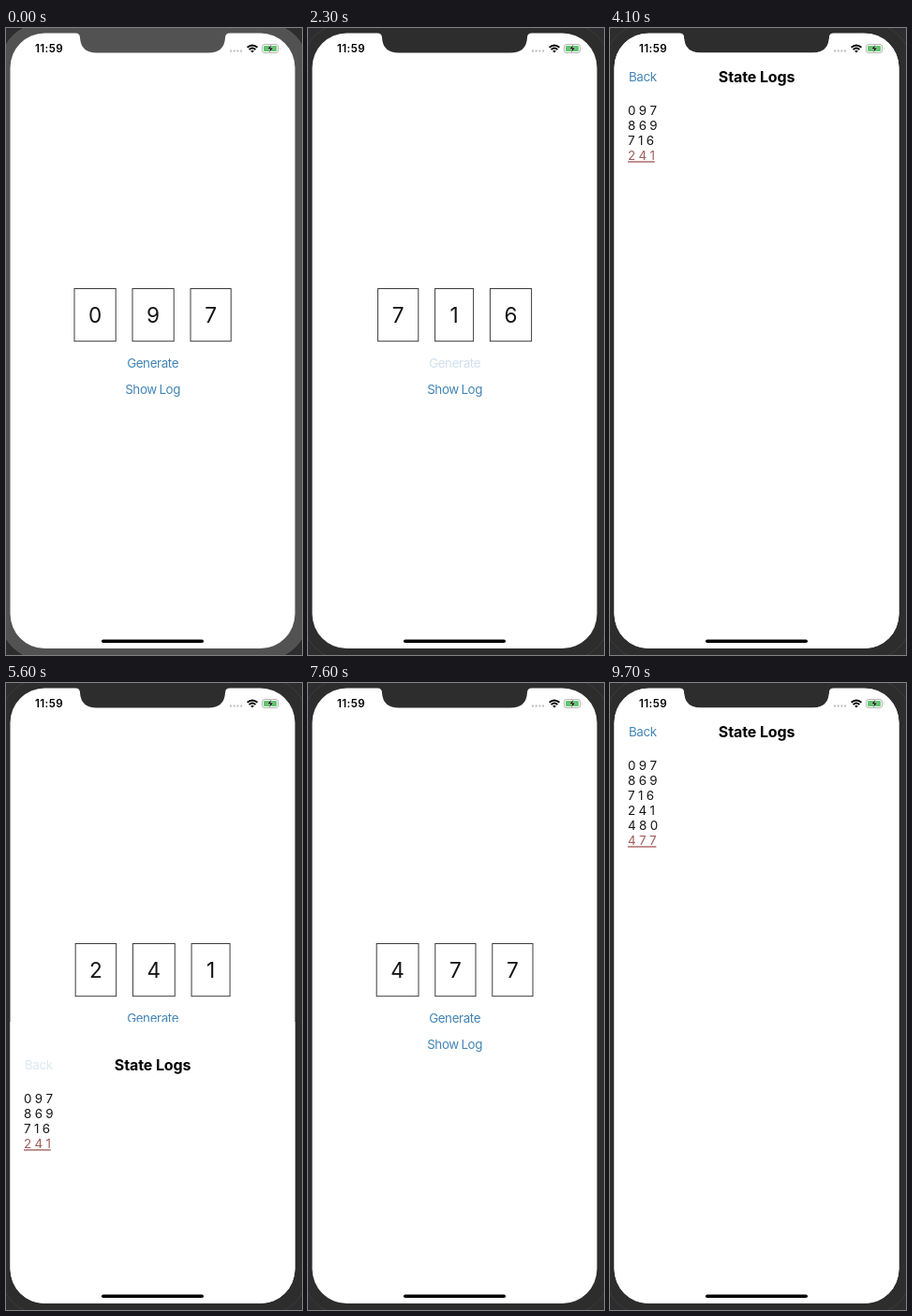
Write an HTML page that moves like this. It is 316 px wide and 670 px high and loops after 10 s.

```html
<!DOCTYPE html>
<html lang="en">
<head>
<meta charset="utf-8">
<style>
  html, body { margin: 0; width: 100%; height: 100%; overflow: hidden; background: #2d2d2d; }
  svg { display: block; width: 316px; height: 670px; }
  text { font: 13.4px Inter, Roboto, sans-serif; fill: #151515; }
  .link { fill: #4285b5; letter-spacing: -.4px; word-spacing: -.8px; }
  .digit { font-size: 22.6px; }
  .mid { text-anchor: middle; }
  .title { font-size: 16px; font-weight: 700; letter-spacing: -.1px; fill: #000; }
  .log { letter-spacing: -.2px; }
  .last { fill: #a35c5c; text-decoration: underline 1px; text-underline-offset: 1.2px; }
  .clock { font-size: 11.6px; font-weight: 600; letter-spacing: .4px; fill: #000; }
</style>
</head>
<body>
<svg viewBox="0 0 316 670">
  <defs>
    <path id="glass" d="M41.5 5.5H74Q79 5.5 79 10.5Q80 26.5 97 26.5H216Q233 26.5 234 10.5Q234 5.5 239 5.5H271.5A37 37 0 0 1 308.5 42.5V626A37 37 0 0 1 271.5 663H41.5A37 37 0 0 1 4.5 626V42.5A37 37 0 0 1 41.5 5.5Z"/>
    <clipPath id="screen"><use href="#glass"/></clipPath>
  </defs>
  <rect id="bezel" x="-6" y="-5" width="328" height="680" rx="45" stroke="#fff" stroke-opacity=".07"/>
  <use href="#glass" fill="#fff"/>
  <g clip-path="url(#screen)">
    <g id="home"></g>
    <g id="sheet"></g>
  </g>
  <text class="clock" x="31" y="26">11:59</text>
  <path d="M239 24.5h13" stroke="#bbb" stroke-width="2" stroke-dasharray="2 1.7"/>
  <path d="M257.6 20.8Q263 16 268.4 20.8M259.6 23.1Q263 20.1 266.4 23.1" fill="none" stroke="#000" stroke-width="1.9"/>
  <path d="M261.2 24.4Q263 23 264.8 24.4L263 26.4Z"/>
  <rect x="273.5" y="17.5" width="17" height="9" rx="2.5" fill="#fff" stroke="#b5b5b5"/>
  <rect x="275" y="19" width="14" height="6" rx="1.2" fill="#5fc56d"/>
  <path d="M292 20.5q1.3 1.5 0 3z" fill="#aaa"/>
  <path d="M283.5 17.5L279 22.6H282L280.8 26.5L285.4 21.3H282.4Z" stroke="#fff" stroke-width=".4"/>
  <rect x="102" y="653.5" width="109" height="3.6" rx="1.8"/>
</svg>
<script>
const LOOP = 10000, STEP = 100, MID = 156.6, GAP = 17.8, DECAY = 11.7, HEIGHT = 657;
const presses = [[1700, '869'], [2200, '716'], [2700, '241'], [6600, '480'], [7300, '477']];
const fade = [.25, .25, .6];
const boxWidth = [44.2, 41, 43.5, 44, 44.8, 44, 44.2, 43.2, 44.2, 44.2];
const visits = [
  { press: 3400, open: 3600, from: 248, back: 5400, close: 5600 },
  { press: 8600, open: 8800, from: 352, back: LOOP, close: LOOP }
];
const $ = id => document.getElementById(id);
const label = (x, y, str, cls, alpha = 1) =>
  `<text x="${x}" y="${y}" class="${cls}" opacity="${alpha}">${str}</text>`;

function boxes(state) {
  const widths = [...state].map(d => boxWidth[d]);
  let x = MID - (widths[0] + widths[1] + widths[2] + 2 * GAP) / 2;
  return widths.map((w, i) => {
    const left = x;
    x += w + GAP;
    return `<rect x="${left}" y="278.5" width="${w}" height="56.2" fill="none" stroke="#3c3c3c"/>`
      + label(left + w / 2, 315, state[i], 'digit mid');
  }).join('');
}

function sheetOffset(t, v) {
  if (t < v.close) {
    const y = v.from * Math.exp(-DECAY * (t - v.open) / 1000);
    return y < 1.1 ? 0 : y;
  }
  return HEIGHT - 301 * Math.exp(-DECAY * (t - v.close) / 1000);
}

function sheet(t, v, states) {
  const y = sheetOffset(t, v);
  const rows = states.map((s, i) =>
    label(19, 93.3 + 16 * i, [...s].join(' '), i === states.length - 1 ? 'log last' : 'log'));
  return `<g transform="translate(0 ${y})"><rect y="6" width="316" height="664" fill="#fff"/>`
    + label(20, 56.7, 'Back', 'link', t >= v.back ? .18 : 1)
    + label(MID, 57.6, 'State Logs', 'title mid') + rows.join('') + '</g>';
}

function draw(t) {
  const states = ['097', ...presses.filter(p => t > p[0]).map(p => p[1])];
  const press = presses.filter(p => t >= p[0]).pop();
  const alpha = press && fade[(t - press[0]) / STEP] || 1;
  const visit = visits.find(v => t >= v.open && t < v.close + 300);
  const logDown = visits.some(v => t >= v.press && t < v.open);
  $('bezel').setAttribute('fill', t < 800 ? '#525252' : '#2d2d2d');
  $('home').innerHTML = boxes(states[states.length - 1])
    + label(MID, 362.7, 'Generate', 'link mid', alpha)
    + label(MID, 390.7, 'Show Log', 'link mid', logDown ? .25 : 1);
  $('sheet').innerHTML = visit ? sheet(t, visit, states) : '';
}

const start = performance.now();
let shown = -1;
function tick() {
  const t = Math.floor((performance.now() - start) % LOOP / STEP) * STEP;
  if (t !== shown) draw(shown = t);
  requestAnimationFrame(tick);
}
tick();
</script>
</body>
</html>
```
